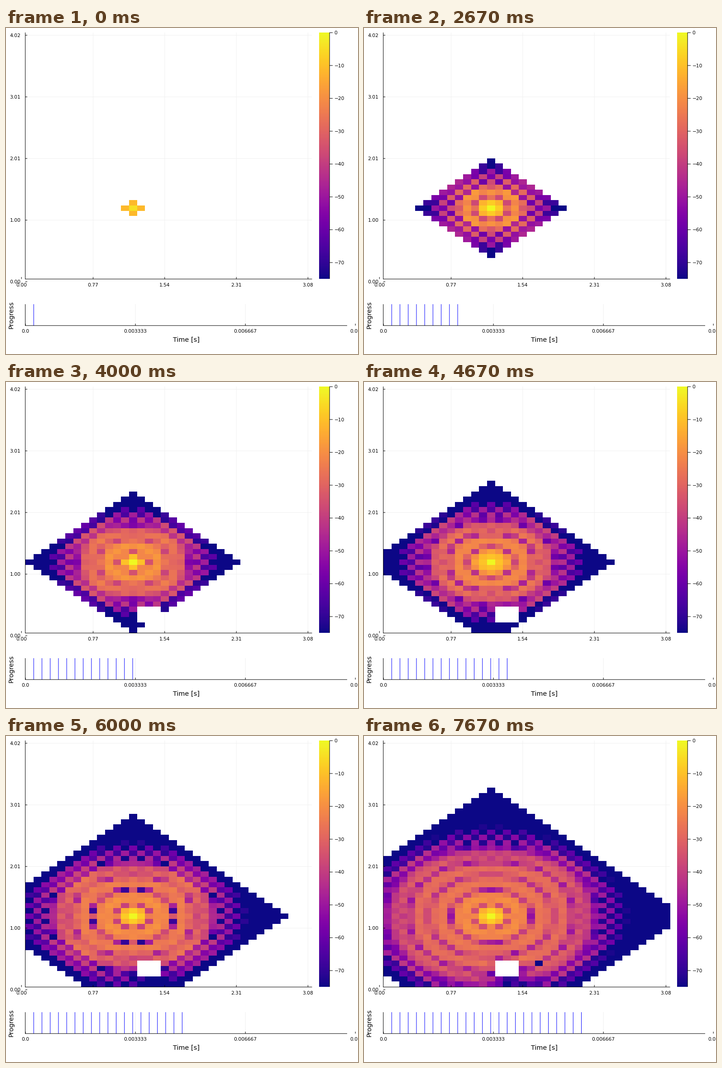
Write a matplotlib script that moves like this. It is 778 by 720 pixels and loops after 8 s.

```python
import numpy as np
import matplotlib.pyplot as plt
from matplotlib.animation import FuncAnimation

W, H, DPI = 778, 720, 100
STEPS, LOOP_MS, TICK_MS = 24, 8000, 40
PX = 72 / DPI                      # one pixel in points
ROWS, COLS, DEPTH = 47, 36, 27     # room grid, one cell of wall around it
SOURCE = (14, 14, 14)
LEFT, RIGHT, TOP, BOTTOM = 42.6, 676, 10, 554
DB_MIN = -75

plt.rcParams["font.family"] = "DejaVu Sans"


def solid_cells():
    solid = np.ones((ROWS + 2, COLS + 2, DEPTH + 2), bool)
    solid[1:-1, 1:-1, 1:-1] = False
    solid[3:6, 15:18] = True
    return solid


def propagate(waves, pressure):
    """Scatter at every junction and move the waves one cell."""
    moved = np.zeros_like(waves)
    for axis in range(3):
        forward = np.moveaxis(pressure - waves[2 * axis + 1], axis, 0)
        backward = np.moveaxis(pressure - waves[2 * axis], axis, 0)
        np.moveaxis(moved[2 * axis], axis, 0)[1:] = forward[:-1]
        np.moveaxis(moved[2 * axis + 1], axis, 0)[:-1] = backward[1:]
    return moved


def simulate():
    """Sound levels in the source plane of a 3D waveguide mesh."""
    solid = solid_cells()
    waves = np.zeros((6,) + solid.shape)
    reached = np.zeros((ROWS, COLS), bool)
    levels = []
    for step in range(STEPS + 1):
        waves[(slice(None),) + SOURCE] = np.cos(2 * np.pi * (step + 1) / 10)
        pressure = waves.sum(axis=0) / 3
        pressure[solid] = 0        # zero pressure reflects with a sign flip
        plane = np.abs(pressure[1:-1, 1:-1, SOURCE[2]])
        reached |= plane > 0
        level = 20 * np.log10(np.maximum(plane, 1e-9))
        levels.append(np.ma.masked_where(~reached, level))
        waves = propagate(waves, pressure)
    return levels[1:]


levels = simulate()

fig = plt.figure(figsize=(W / DPI, H / DPI), dpi=DPI, facecolor="white")
ax = fig.add_axes([0, 0, 1, 1])
ax.axis("off")


def line(xs, ys, color="black", z=5):
    return ax.plot(xs, ys, color=color, lw=PX, zorder=z, snap=False,
                   solid_capstyle="butt")[0]


def label(x, y, text, size=10.67, ha="center"):
    """Text whose digits or capitals are centred on y."""
    ax.text(x, y + 0.365 * size, text, fontsize=size * PX, ha=ha,
            va="baseline", zorder=6)


# Room plot
GRID = "#f0f0f0"
for i, text in enumerate(["0.00", "0.77", "1.54", "2.31", "3.08"]):
    x = 34.2 + 158.3 * i
    if i:
        line([x, x], [TOP, BOTTOM], GRID, 1)
    line([x, x], [550, 554.5])
    label(x, 566.8, text)
for i, text in enumerate(["0.00", "1.00", "2.01", "3.01", "4.02"]):
    y = 560.4 - 136.1 * i
    if i:
        line([LEFT, RIGHT], [y, y], GRID, 1)
    line([LEFT, 47], [y, y])
    label(32.3, y, text, ha="right")
line([LEFT, LEFT], [TOP, 555])
line([LEFT - 0.5, RIGHT + 0.5], [554.4, 554.4])

style = dict(cmap="plasma", vmin=DB_MIN, vmax=0, aspect="auto",
             origin="lower")
field = ax.imshow(levels[0], extent=(LEFT, RIGHT, BOTTOM, TOP),
                  interpolation="nearest", zorder=2, **style)

# Colour scale
ax.imshow(np.linspace(DB_MIN, 0, 256)[:, None], zorder=2,
          extent=(692, 715, BOTTOM, TOP), **style)
line([715.2, 715.2], [TOP, BOTTOM])
for db in range(0, -80, -10):
    y = TOP + 0.3 + (BOTTOM - TOP) * db / DB_MIN
    line([715, 722], [y, y])
    label(725.5, y, str(db).replace("-", "\u2212"), ha="left")

# Progress plot
ZERO, PER_BAR = 43, 18.23
AXIS_Y = 657.2
for i, text in enumerate(["0.0", "0.003333", "0.006667", "0.01"]):
    x = ZERO + PER_BAR * 40 / 3 * i
    if i in (1, 2):
        line([x, x], [610, AXIS_Y], GRID, 1)
    line([x, x], [653, AXIS_Y])
    label(x, 669.4, text)
line([LEFT, LEFT], [610, AXIS_Y + 0.5])
line([LEFT - 0.5, 754], [AXIS_Y, AXIS_Y])
label(399, 687.5, "Time [s]", 14.4)
ax.text(12, 633.5, "Progress", fontsize=14.2 * PX, rotation=90,
        ha="center", va="center", zorder=6)

bars = [line([x, x], [610, AXIS_Y], "blue", 4)
        for x in ZERO + PER_BAR * np.arange(1, STEPS + 1)]

ax.set_xlim(0, W)
ax.set_ylim(H, 0)


def update(frame):
    # The last moment of the tick decides, so no step appears late.
    step = (frame * TICK_MS + TICK_MS - 1) * STEPS // LOOP_MS
    field.set_data(levels[step])
    for i, bar in enumerate(bars):
        bar.set_visible(i <= step)
    return [field, *bars]


anim = FuncAnimation(fig, update, frames=LOOP_MS // TICK_MS,
                     interval=TICK_MS, repeat=True, repeat_delay=0,
                     blit=False)
plt.show()
```
